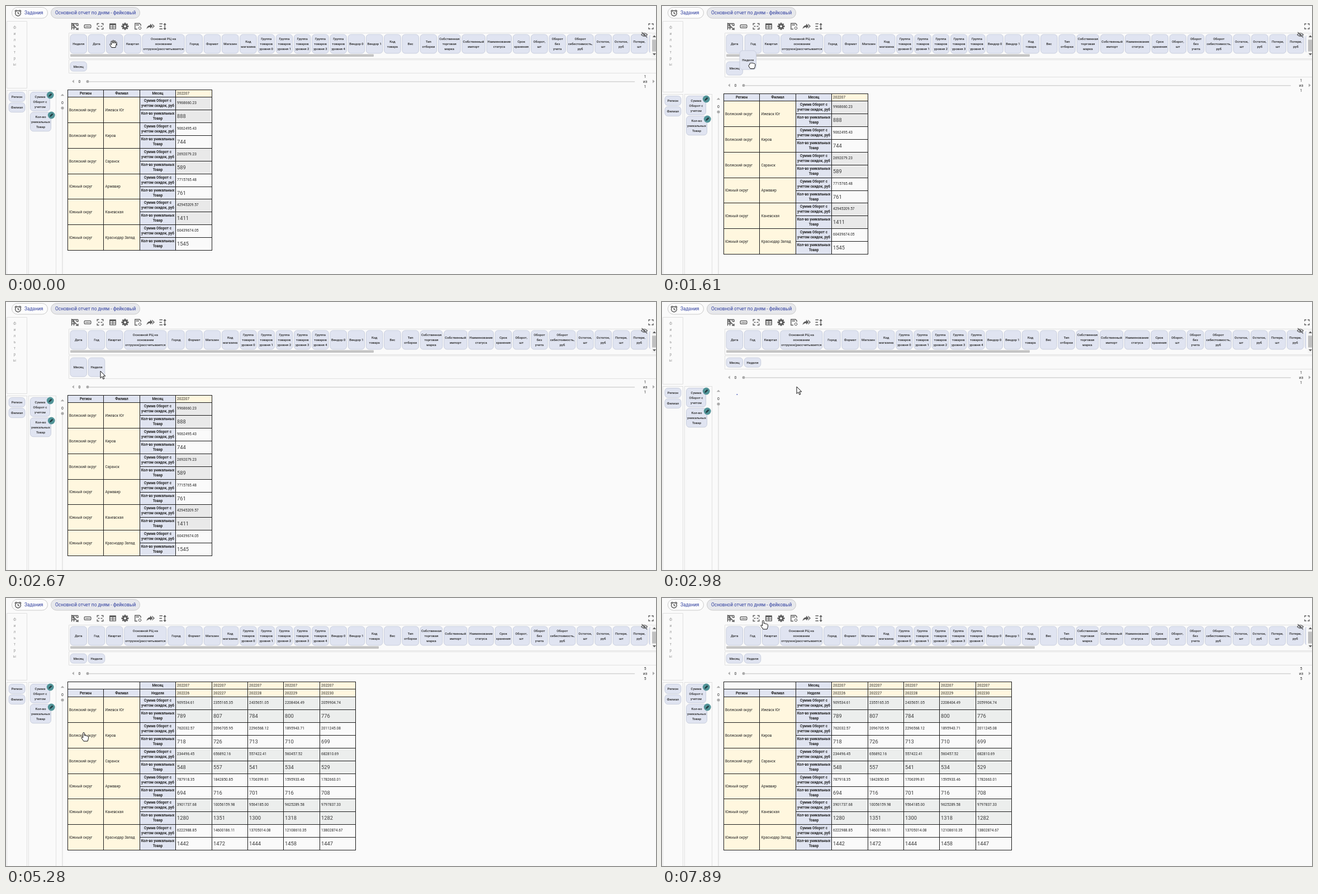
An HTML page that plays this animation: 1163 by 481 pixels, repeating every 8 s.

```html
<!DOCTYPE html>
<html lang="ru">
<head>
<meta charset="utf-8">
<style>
html, body { margin: 0; width: 100%; height: 100%; overflow: hidden; background: #fafafa; }
svg { display: block; width: 1163px; height: 481px; }
text { font-family: Roboto, "Open Sans", sans-serif; fill: #262626; }
.line { fill: none; stroke: #e0e0e0; }
.icon { fill: none; stroke: #5c5c5c; stroke-width: 1.4; }
.solid { fill: #5c5c5c; stroke: none; }
.cursor path { fill: #fff; stroke: #111; stroke-linejoin: round; }
</style>
</head>
<body>
<svg id="stage" viewBox="0 0 1163 481" xmlns="http://www.w3.org/2000/svg"></svg>
<script>
const LOOP = 8000, PICK = 1060, DROP = 2100, RUN = 2980, LOADED = 4090;
const GAP = 2.75, CHIP = 29.5, PITCH = CHIP + GAP;
const BLUE = "#e0e4f1", HOVER = "#dadeec";

const label = (x, y, s, size, opt = "") =>
  `<text x="${x}" y="${y + size * 0.355}" font-size="${size}" ${opt}>${s}</text>`;
const mid = (x, y, s, size, opt = "") => label(x, y, s, size, 'text-anchor="middle" ' + opt);
const box = (x, y, w, h, fill, opt = "") =>
  `<rect x="${x}" y="${y}" width="${w}" height="${h}" fill="${fill}" ${opt}/>`;
const path = (d, cls, opt = "") => `<path d="${d}" class="${cls}" ${opt}/>`;
const group = (id, body, opt = "") => `<g id="${id}" ${opt}>${body}</g>`;
const lines = (x, y, s, size, step, opt) => {
  const rows = s.split("|");
  return rows.map((r, i) => mid(x, y + (i - (rows.length - 1) / 2) * step, r, size, opt)).join("");
};
const chip = (x, y, w, h, s, fill = BLUE) =>
  box(x, y, w, h, fill, 'rx="5.5" stroke="#c6cbdb" stroke-width="0.9"') +
  lines(x + w / 2, y + h / 2 + 0.2, s, 5.9, 9, 'font-weight="500"');

// Available fields; wide ones carry their own width
const fields = [
  ["Дата"], ["Год"], ["Квартал"],
  ["Основной РЦ на|основании|отгрузок(рассчитывается", 75.2],
  ["Город"], ["Формат"], ["Магазин"], ["Код|магазина"],
  ...[0, 1, 2, 3, 4].map(n => ["Группа|товаров|уровня " + n]),
  ["Вендор 0"], ["Вендор 1"], ["Код|товара"], ["Вес"], ["Тип|отборки"],
  ["Собственная|торговая|марка", 39.7], ["Собственный|импорт", 41.3],
  ["Наименование|статуса", 44.6], ["Срок|хранения"], ["Оборот,|шт"],
  ["Оборот|без|учета"], ["Оборот|себестоимость,|руб", 47],
  ["Остаток,|шт"], ["Остаток,|руб"], ["Потери,|шт"], ["Потери,|руб"], [""]
];
let nextX = 115;
for (const f of fields) {
  f[1] = f[1] || CHIP;
  f[2] = nextX;
  nextX += f[1] + GAP;
}

function toolbar() {
  const rays = [...Array(8)].map((_, i) =>
    `<rect x="211.6" y="30" width="2.8" height="3" class="solid" transform="rotate(${i * 45} 213 36.5)"/>`).join("");
  return path("M117.5 31.5H129M117.5 31.5V42.5M117.5 35.5H121M121.5 31.5V42.5M117.5 39H124M125.5 31.5V34.5M129 31.5V35H126M125 42H129V39M117 30.5L129.5 43", "icon") +
    box(140.2, 33.6, 11.6, 5.8, "none", 'rx="1.5" class="icon"') +
    path("M142.5 35.7h1.8v1.8h-1.8zM145.2 35.7h1.8v1.8h-1.8zM147.9 35.7h1.8v1.8h-1.8z", "solid") +
    path("M163.2 34.5V31.5H166.5M170.5 31.5H173.8V34.5M173.8 38.5V41.5H170.5M166.5 41.5H163.2V38.5M164.5 36.5H167.5M169.5 36.5H172.5", "icon") +
    box(185, 31.3, 12, 10.4, "#5c5c5c", 'rx="1"') +
    box(186.5, 34.6, 4, 2.4, "#fafafa") + box(191.7, 34.6, 4, 2.4, "#fafafa") +
    box(186.5, 38.2, 4, 2.2, "#fafafa") + box(191.7, 38.2, 4, 2.2, "#fafafa") +
    rays + '<circle cx="213" cy="36.5" r="3.3" fill="none" stroke="#5c5c5c" stroke-width="2.8"/>' +
    path("M235 41.5H230.8V31.3H239L241.2 33.5V35.5M232.5 34H238", "icon") +
    '<circle cx="239.5" cy="39.7" r="2.2" class="icon" stroke-dasharray="1.2 .5"/>' +
    path("M251.5 41.5C252 37 254.5 34.8 258 34.6V31.8L262.5 36.3L258 40.6V38C255 38 253 39 251.5 41.5ZM261.3 31.8L266 36.3L261.3 40.6V39L264 36.3L261.3 33.5Z", "solid") +
    path("M274.5 32H280M274.5 36.5H279M274.5 41H280M284.2 32V41.5M282.2 33.7L284.2 31.6L286.2 33.7M282.2 39.8L284.2 41.9L286.2 39.8", "icon") +
    path("M1150 34.5V32H1152.8M1155.2 32H1158V34.5M1158 38.5V41H1155.2M1152.8 41H1150V38.5", "icon") +
    path("M1136.5 51.5Q1142 45.5 1147.5 51.5Q1142 57 1136.5 51.5M1137.5 47L1147 56.5", "icon", 'style="stroke-width:1.2"') +
    '<circle cx="1142" cy="51.5" r="1.7" class="solid"/>';
}

function header() {
  const pill = 'rx="9.8" stroke="#cacaca"';
  return box(10.5, 2.5, 64, 19.5, "#fcfcfc", pill) + box(80.5, 2.5, 159, 19.5, "#e7e8ec", pill) +
    '<circle cx="21.5" cy="13" r="4.9" class="icon" style="stroke:#333;stroke-width:1.1"/>' +
    path("M21.5 10V13.3L23.8 14.6M15.6 9.6L18.7 7M24.3 7L27.4 9.6", "icon", 'style="stroke:#333;stroke-width:1.1"') +
    label(33, 12.3, "Задания", 8.4, 'style="fill:#303f9f"') +
    label(88, 12.3, "Основной отчет по дням - фейковый", 8.4, 'style="fill:#303f9f"');
}

function frame() {
  const letters = [..."Фильтры"].map((c, i) => mid(15.5, 39 + i * 11, c, 6.8, 'style="fill:#999"')).join("");
  return letters + path("M112.5 94.5V48.5H1163M112.5 94.5H1163", "line") +
    box(1155.5, 48.5, 7.5, 43, "#f3f3f3") + box(1156, 60.5, 7, 21, "#c1c1c1") +
    path("M1157 56L1160 52.5L1163 56ZM1157 85L1160 88.5L1163 85Z", "solid");
}

function badge(x, y) {
  return `<circle cx="${x}" cy="${y}" r="6.4" fill="#529498"/>` +
    path(`M${x - 3} ${y + 3}l.5 -2.2l4 -4l1.7 1.7l-4 4z`, "", 'fill="#22383d"');
}

function lower() {
  const arrow = d => path(d, "", 'fill="#aaa"');
  return box(1.5, 151.5, 36, 400, "none", 'class="line"') + box(40.5, 151.5, 49, 400, "none", 'class="line"') +
    chip(5, 154.5, 29, 17, "Регион") + chip(5, 173.6, 29, 17, "Филиал") +
    chip(43.5, 154.4, 35, 34, "Сумма|Оборот с|учетом") + chip(43.5, 190.8, 37, 34, "Кол-во|уникальных|Товар") +
    badge(79.2, 160) + badge(81.2, 196) +
    box(149, 135, 976, 1.6, "#d6d6d6") + '<circle cx="146" cy="135.4" r="2.5" fill="#aaa"/>' +
    mid(131.5, 135.3, "0", 6.8) + arrow("M121.7 132.2L118.3 135.3L121.7 138.4Z") +
    arrow("M1157 132.2L1160.7 135.3L1157 138.4Z") +
    box(100.3, 185, 1.4, 400, "#dedede") + '<circle cx="101" cy="183" r="2.6" fill="#aaa"/>' +
    mid(101, 174, "0", 6.8) + arrow("M97.7 161.3L101 157.8L104.3 161.3Z") +
    '<g id="pages"></g>';
}

const places = ["Ижевск Юг", "Киров", "Саранск", "Армавир", "Каневская", "Краснодар Запад"];
const colX = i => Math.round(110 + 64.4 * i) + 0.5;

// Each data row: sums, then counts, for one place
function table(heads, data, grey) {
  const cream = "#fff7df", bold = 'font-weight="700"', pale = "#fafafa";
  const cell = (c, span, y, y2, fill) =>
    box(colX(c), y, colX(c + span) - colX(c), y2 - y, fill, 'stroke="#1c1c1c"');
  const cx = c => (colX(c) + colX(c + 1)) / 2;
  let out = "", y = 150.5;
  heads.forEach(([name, values], r) => {
    const y2 = y + 13 + r, cy = (y + y2) / 2;
    const last = r === heads.length - 1;
    if (last) {
      ["Регион", "Филиал"].forEach((s, c) => out += cell(c, 1, y, y2, BLUE) + mid(cx(c), cy, s, 6.45, bold));
    } else out += cell(0, 2, y, y2, pale);
    out += cell(2, 1, y, y2, BLUE) + mid(cx(2), cy, name, 6.45, bold);
    values.forEach((v, i) => out += cell(3 + i, 1, y, y2, cream) + label(colX(3 + i) + 2.5, cy, v, 6.6));
    y = y2;
  });
  const rowY = k => Math.floor(y + k * 45.85) + 0.5;
  data.forEach(([sums, counts], k) => {
    const top = rowY(k), end = rowY(k + 1), cut = top + 23;
    const cy = (top + end) / 2, fill = k % 2 ? pale : grey;
    out += cell(0, 1, top, end, cream) + label(113, cy, k < 3 ? "Волжский округ" : "Южный округ", 6.5) +
      cell(1, 1, top, end, cream) + label(177.5, cy, places[k], 6.5) +
      cell(2, 1, top, cut, BLUE) + lines(cx(2), top + 10.5, "Сумма Оборот с|учетом скидок, руб", 6.4, 9, bold) +
      cell(2, 1, cut, end, BLUE) + lines(cx(2), cut + 11, "Кол-во уникальных|Товар", 6.4, 9, bold);
    const counted = counts.split(" ");
    sums.split(" ").forEach((s, i) => {
      const x = colX(3 + i);
      out += cell(3 + i, 1, top, cut, fill) + label(x + 2.5, top + 10.5, s, 6.55) +
        cell(3 + i, 1, cut, end, fill) + label(x + 2.5, cut + 11.3, counted[i], 9.3, 'style="fill:#3a3a3a"');
    });
  });
  return out;
}

const byMonth = table([["Месяц", ["202207"]]], [
  ["9968660.23", "888"], ["9062495.43", "744"], ["2692079.23", "589"],
  ["7715765.48", "761"], ["42945209.57", "1411"], ["60439674.05", "1545"]
], "#e9e9e9");

const weeks = [26, 27, 28, 29, 30];
const byWeek = table([["Месяц", weeks.map(() => "202207")], ["Неделя", weeks.map(w => "2022" + w)]], [
  ["909534.61 2355165.35 2435651.05 2208404.49 2059904.74", "789 807 784 800 776"],
  ["762032.57 2096705.95 2296568.12 1895943.71 2011245.08", "718 726 713 710 699"],
  ["234496.45 656892.16 557422.41 560457.52 682810.69", "548 557 541 534 529"],
  ["787918.35 1842850.85 1706399.81 1595933.46 1782663.01", "694 716 701 716 708"],
  ["3901737.68 10056159.98 9564185.00 9625289.58 9797837.33", "1280 1351 1300 1318 1282"],
  ["6222988.85 14600186.11 13705014.08 12108610.35 13802874.67", "1442 1472 1444 1458 1447"]
], "#eceeed");

const cursors = {
  arrow: "M0 0V12.5L2.9 9.8L4.9 14.4L6.9 13.5L4.9 9H8.8Z",
  pointer: "M-1.3 10V1.5C-1.3 0 1.3 0 1.3 1.5V6C1.5 5 3.8 5 3.9 6.6C4.3 5.8 6.2 6 6.3 7.2C6.8 6.6 8.4 6.8 8.4 8.2V11.5L7 16H0L-3.8 10.5C-4.8 8.8 -3 7.8 -1.3 10Z",
  open: "M-3.2 6.5L-6 1.6C-6.8 0 -5 -.8 -3.8 .8L-3 1.6L-4.2 -3.5C-4.5 -5.2 -2.4 -5.5 -2 -4L-1.3 -1.2V-5.4C-1.2 -6.9 .8 -6.9 .9 -5.4V-1.4L1.8 -4.8C2.2 -6.2 4 -5.8 3.8 -4.4L3.2 -.9L4.4 -2.8C5.2 -4 6.7 -3.2 6.1 -1.8L4.6 3.2L4 6.5Z",
  closed: "M-3 6.5L-6 1.8C-6 -.2 -5 -1 -4 -.6V-2.6C-3.6 -4.2 -2 -4 -1.5 -3C-.8 -4.5 .8 -4.2 1.2 -3C2 -4 3.4 -3.6 3.6 -2.4C4.6 -3 6 -2.2 5.9 -.8L5.5 2.5L4 6.5Z"
};

document.getElementById("stage").innerHTML =
  '<defs><clipPath id="strip"><rect x="112" y="46" width="1041" height="48"/></clipPath></defs>' +
  header() + frame() +
  group("row", fields.map(([s, w, x]) => `<g>${chip(x, 51, w, 34, s)}</g>`).join(""), 'clip-path="url(#strip)"') +
  box(115, 86.5, 543, 4.5, "#c4c4c4", 'id="thumb" rx="1"') + toolbar() +
  path("", "line", 'id="edges"') +
  group("low", lower() + group("byMonth", byMonth) + group("byWeek", byWeek)) +
  path("", "", 'id="spin" fill="none" stroke="#3f51b5" stroke-width="1.5" stroke-linecap="round"') +
  group("month", "") + group("week", "") +
  group("cursor", path("", ""), 'class="cursor"');

const $ = id => document.getElementById(id);
const show = (id, on) => $(id).setAttribute("display", on ? "inline" : "none");
const rowChips = [...$("row").children];
const shape = $("cursor").firstChild;

// Linear interpolation over [time, ...values] keys
function at(keys, t) {
  let i = 0;
  while (i < keys.length - 1 && keys[i + 1][0] <= t) i++;
  const a = keys[i], b = keys[i + 1] || a;
  const p = b === a ? 0 : Math.max(0, (t - a[0]) / (b[0] - a[0]));
  return a.slice(1).map((v, n) => v + (b[n + 1] - v) * p);
}

const route = [
  [0, 192, 68], [130, 192, 68], [800, 138, 76], [PICK, 137, 77],
  [1610, 161, 106], [1750, 161, 106], [2050, 169, 126], [2260, 169, 124],
  [RUN - 1, 169, 124], [RUN, 241, 152], [3120, 241, 152], [3700, 249, 174],
  [LOADED, 236, 190], [4250, 235, 193], [4390, 235, 193], [5030, 150, 238],
  [5280, 139, 241], [5430, 139, 241], [5650, 123, 251], [5850, 135, 240],
  [6110, 158, 217], [6240, 159, 215], [6700, 166, 195], [7200, 171, 172],
  [7330, 176, 168], [7600, 187, 100], [7890, 181, 40], [LOOP, 181, 40]
];
const push = [[0, 0], [1480, 0], [1610, 7], [1750, 7], [1880, 17], [RUN - 1, 17], [RUN, 0]];
const hole = [[0, PITCH], [1330, PITCH], [1550, 1], [1750, 1], [1830, 0]];

function cursorKind(t, y) {
  if (t < PICK) return "open";
  if (t < DROP) return "closed";
  if (t < 2260) return "open";
  return t >= LOADED && (y > 150 || y < 48) ? "pointer" : "arrow";
}

function draw(t) {
  const [x, y] = at(route, t), [dy] = at(push, t), [gap] = at(hole, t);
  const loaded = t >= LOADED;

  rowChips.forEach((g, i) => {
    const dx = i || gap > 1 ? gap : 0, left = fields[i][2] + dx;
    g.setAttribute("transform", `translate(${dx} 0)`);
    const hover = t < PICK && x >= left && x <= left + fields[i][1];
    g.firstChild.setAttribute("fill", hover ? HOVER : BLUE);
  });

  $("thumb").setAttribute("width", loaded ? 552 : 543);
  $("edges").setAttribute("d",
    `M1.5 27.5H37.5V${147.5 + dy}H1.5ZM1163 96.5H112.5V${120.5 + dy}H1163`);
  $("low").setAttribute("transform", `translate(0 ${dy})`);
  const n = loaded ? 5 : 1;
  $("pages").innerHTML = lines(1143.7, 135.3, `${n}|из|${n}`, 6.6, 9);
  show("byMonth", t < RUN);
  show("byWeek", loaded);

  $("month").innerHTML = chip(115, 100, CHIP, 17 + dy, "Месяц");
  let wx = 115, wy = 51, wh = 34;
  if (t >= DROP) [wx, wy, wh] = [115 + PITCH, 100, 17 + dy];
  else if (t >= PICK) [wx, wy] = [x - 22, y - 26];
  $("week").innerHTML = chip(wx, wy, CHIP, wh, "Неделя");

  const waiting = t >= RUN && !loaded;
  show("spin", waiting);
  if (waiting) {
    const k = Math.max(0, t - RUN - 140) / 1000, r = 12;
    const a = -Math.PI / 2 + k * 5, b = a + 0.06 + 2.2 * (1 - Math.cos(k * 5));
    const point = q => `${134 + r * Math.cos(q)} ${178 + r * Math.sin(q)}`;
    $("spin").setAttribute("d", `M${point(a)}A${r} ${r} 0 ${b - a > Math.PI ? 1 : 0} 1 ${point(b)}`);
  }

  shape.setAttribute("d", cursors[cursorKind(t, y)]);
  $("cursor").setAttribute("transform", `translate(${x} ${y})`);
}

const begin = performance.now();
function tick(now) {
  draw(Math.max(0, now - begin) % LOOP);
  requestAnimationFrame(tick);
}
draw(0);
requestAnimationFrame(tick);
</script>
</body>
</html>
```
